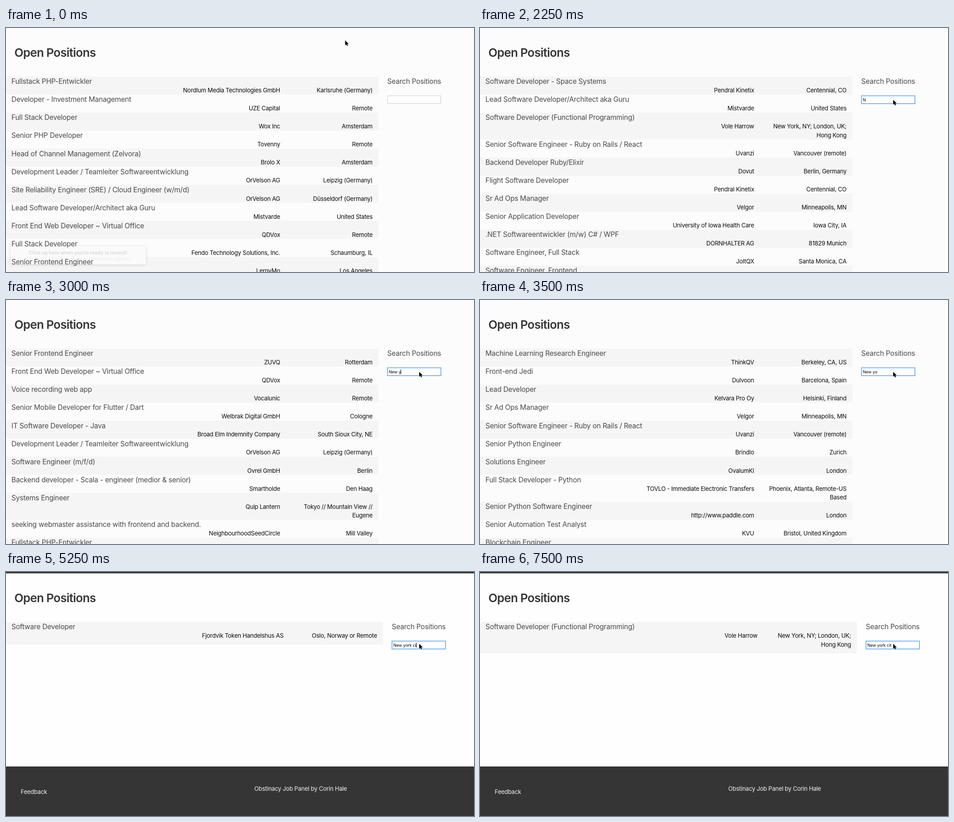
An HTML page that plays this animation: 1033x542 px, repeating every 8000 ms.

```html
<!DOCTYPE html>
<html lang="en">
<head>
<meta charset="utf-8">
<title>Open Positions</title>
<style>
  html, body { margin: 0; width: 100%; height: 100%; overflow: hidden; background: #fcfcfc; }
  svg { display: block; width: 100vw; height: 100vh; }
  text { font-family: Inter, "Open Sans", sans-serif; font-optical-sizing: none; white-space: pre; }
  .head { font-size: 26px; font-weight: 600; letter-spacing: -.72px; fill: #363636; }
  .job { font-size: 15.5px; letter-spacing: -.22px; fill: #4a4a4a; }
  .info { font-size: 13px; letter-spacing: -.25px; fill: #0a0a0a; }
  .end { text-anchor: end; }
  .foot { fill: #f2f2f2; }
  .typed { font-size: 9px; fill: #000; }
  .tip { text-anchor: middle; font-size: 9px; fill: #ededed; }
  .tip.bold { font-size: 10.5px; font-weight: 700; fill: #dcdcdc; }
</style>
</head>
<body>
<svg id="stage" viewBox="0 0 1033 542" preserveAspectRatio="none"></svg>
<script>
const LOOP = 8000;
const stage = document.getElementById('stage');

// One job per line: title | company | location, "~" breaks the location.
const lists = {
  all: `Fullstack PHP-Entwickler|Nordlum Media Technologies GmbH|Karlsruhe (Germany)
Developer - Investment Management|UZE Capital|Remote
Full Stack Developer|Wox Inc|Amsterdam
Senior PHP Developer|Tovenny|Remote
Head of Channel Management (Zelvora)|Brolo X|Amsterdam
Development Leader / Teamleiter Softwareentwicklung|OrVelson AG|Leipzig (Germany)
Site Reliability Engineer (SRE) / Cloud Engineer (w/m/d)|OrVelson AG|Düsseldorf (Germany)
Lead Software Developer/Architect aka Guru|Mistvarde|United States
Front End Web Developer ~ Virtual Office|QDVox|Remote
Full Stack Developer|Fendo Technology Solutions, Inc.|Schaumburg, IL
Senior Frontend Engineer|LernyMo|Los Angeles`,
  n: `Software Developer - Space Systems|Pendral Kinetix|Centennial, CO
Lead Software Developer/Architect aka Guru|Mistvarde|United States
Software Developer (Functional Programming)|Vole Harrow|New York, NY; London, UK;~Hong Kong
Senior Software Engineer - Ruby on Rails / React|Uvanzi|Vancouver (remote)
Backend Developer Ruby/Elixir|Dovut|Berlin, Germany
Flight Software Developer|Pendral Kinetix|Centennial, CO
Sr Ad Ops Manager|Velgor|Minneapolis, MN
Senior Application Developer|University of Iowa Health Care|Iowa City, IA
.NET Softwareentwickler (m/w) C# / WPF|DORNHALTER AG|81829 Munich
Software Engineer, Full Stack|JoltQX|Santa Monica, CA
Software Engineer, Frontend|JoltQX|Santa Monica, CA`,
  ne: `Senior .NET Developer|Zebro Solutions|New Orleans, LA
Software Developer (Functional Programming)|Vole Harrow|New York, NY; London, UK;~Hong Kong
Network DevOps Engineer|Ulvo|Madison, WI
Senior Frontend Engineer|ZUVQ|Rotterdam
Senior Python Engineer|Brindlo|Zurich
Backend Developer Ruby/Elixir|Dovut|Berlin, Germany
Lead Developer|Kelvara Pro Oy|Helsinki, Finland
Test Automation Engineer|Malvix|Vianen
Software Engineer, Full Stack|JoltQX|Santa Monica, CA
Solutions Engineer|OvalumKI|London
Senior PHP Developer|Tovenny|Remote`,
  new: `Software Developer (Functional Programming)|Vole Harrow|New York, NY; London, UK;~Hong Kong
Senior .NET Developer|Zebro Solutions|New Orleans, LA
Lead Software Developer|Ostiml|Calgary
Front-end Jedi|Dulvoon|Barcelona, Spain
IT Software Developer - Java|Broad Elm Indemnity Company|South Sioux City, NE
Sr Ad Ops Manager|Velgor|Minneapolis, MN
Software Engineer (m/f/d)|Ovrel GmbH|Berlin
Flight Software Developer|Pendral Kinetix|Centennial, CO
Lead Engineer (m/f)|Glanzohr GmbH|Munich, Germany
Voice recording web app|Vocalunic|Remote
Senior Application Developer|University of Iowa Health Care|Iowa City, IA`,
  newY: `Senior Frontend Engineer|ZUVQ|Rotterdam
Front End Web Developer ~ Virtual Office|QDVox|Remote
Voice recording web app|Vocalunic|Remote
Senior Mobile Developer for Flutter / Dart|Welbrak Digital GmbH|Cologne
IT Software Developer - Java|Broad Elm Indemnity Company|South Sioux City, NE
Development Leader / Teamleiter Softwareentwicklung|OrVelson AG|Leipzig (Germany)
Software Engineer (m/f/d)|Ovrel GmbH|Berlin
Backend developer - Scala - engineer (medior & senior)|Smartholde|Den Haag
Systems Engineer|Quip Lantern|Tokyo // Mountain View //~Eugene
seeking webmaster assistance with frontend and backend.|NeighbourhoodSeedCircle|Mill Valley
Fullstack PHP-Entwickler|Nordlum Media Technologies GmbH|Karlsruhe (Germany)`,
  newYo: `Machine Learning Research Engineer|ThinkQV|Berkeley, CA, US
Front-end Jedi|Dulvoon|Barcelona, Spain
Lead Developer|Kelvara Pro Oy|Helsinki, Finland
Sr Ad Ops Manager|Velgor|Minneapolis, MN
Senior Software Engineer - Ruby on Rails / React|Uvanzi|Vancouver (remote)
Senior Python Engineer|Brindlo|Zurich
Solutions Engineer|OvalumKI|London
Full Stack Developer - Python|TOVLO - Immediate Electronic Transfers|Phoenix, Atlanta, Remote-US~Based
Senior Python Software Engineer|http://www.paddle.com|London
Senior Automation Test Analyst|KVU|Bristol, United Kingdom
Blockchain Engineer|Fjordvik Token Handelshus AS|Oslo, Norway or Remote`,
  newYor: `Network DevOps Engineer|Ulvo|Madison, WI
Lead Developer|Kelvara Pro Oy|Helsinki, Finland
Senior Python Engineer|Brindlo|Zurich
Backend Engineer (f/m) Node.js|wanduu Group GmbH|Berlin
Senior Frontend Engineer|ZUVQ|Rotterdam
Solutions Engineer|OvalumKI|London
Full Stack Developer|Fendo Technology Solutions, Inc.|Schaumburg, IL
Lead Software Developer|Ostiml|Calgary
Senior Automation Test Analyst|KVU|Bristol, United Kingdom
Test Automation Engineer|Malvix|Vianen
Software Engineer (m/f/d)|Ovrel GmbH|Berlin`,
  newYork: `Softwareentwickler / Software Engineer|OrVelson AG|Leipzig (Germany)
Senior Python Engineer|Brindlo|Zurich
Senior .NET Developer|Zebro Solutions|New Orleans, LA
Network DevOps Engineer|Ulvo|Madison, WI
Full Stack Developer|Fendo Technology Solutions, Inc.|Schaumburg, IL
Senior Mobile Developer | uXO|unTrod unBarter GmbH|Berlin, Germany
Test Automation Engineer|Malvix|Vianen
Lead Engineer (m/f)|Glanzohr GmbH|Munich, Germany
Backend Engineer (f/m) Node.js|wanduu Group GmbH|Berlin
Lead Software Developer|Ostiml|Calgary
IT-Administrator/Applikationsbetreuer (m/w/d) im Betrieb Bilanzierung und Batch|ZuV Kreditverbund|Berlin`,
  space: `Software Developer|Fjordvik Token Handelshus AS|Oslo, Norway or Remote
Senior Python Engineer|Brindlo|Zurich
Senior Frontend Engineer|LernyMo|Los Angeles
Network DevOps Engineer|Ulvo|Madison, WI
Lead Software Developer|Ostiml|Calgary
Senior PHP Developer|Tovenny|Remote
Test Automation Engineer|Malvix|Vianen
Full Stack Developer|Wox Inc|Amsterdam`,
  ci: 'Software Developer|Fjordvik Token Handelshus AS|Oslo, Norway or Remote',
  city: 'Senior Application Developer|University of Iowa Health Care|Iowa City, IA',
  cit: 'Software Developer (Functional Programming)|Vole Harrow|New York, NY; London, UK;~Hong Kong'
};

// Each step changes only what it lists.
const steps = [
  [0, { list: 'all', typed: '', tip: true, pointer: 'arrow', x: 748.5, y: 27.5 }],
  [250, { tip: false, x: 912, y: 143.5 }],
  [500, { pointer: 'beam', x: 917, y: 156 }],
  [750, { y: 157 }],
  [1000, { pointer: 'arrow', x: 912, y: 159.5 }],
  [1250, { focus: true, caret: true }],
  [1750, { caret: false }],
  [2250, { list: 'n', typed: 'N' }],
  [2500, { list: 'ne', typed: 'Ne', caret: true }],
  [2750, { list: 'new', typed: 'New' }],
  [3000, { list: 'newY', typed: 'New y' }],
  [3250, { list: 'newYo', typed: 'New yo' }],
  [3500, { caret: false }],
  [4000, { list: 'newYor', typed: 'New yor', caret: true }],
  [4500, { list: 'newYork', typed: 'New york' }],
  [4750, { list: 'space', typed: 'New york ', footer: 447 }],
  [5000, { caret: false }],
  [5250, { list: 'ci', typed: 'New york ci', caret: true, footer: 432, short: true }],
  [5500, { list: 'city', typed: 'New york city' }],
  [5750, { caret: false }],
  [6250, { list: 'ci', typed: 'New york cit', caret: true }],
  [6750, { caret: false }],
  [7000, { list: 'city', typed: 'New york city', caret: true }],
  [7500, { list: 'cit', typed: 'New york cit', caret: false }]
];

const escapeText = s => s.replace(/&/g, '&amp;').replace(/</g, '&lt;');
const text = (x, y, cls, s) => `<text x="${x}" y="${y}" class="${cls}">${escapeText(s)}</text>`;
const rect = (x, y, w, h, fill, more = '') =>
  `<rect x="${x}" y="${y}" width="${w}" height="${h}" fill="${fill}" ${more}/>`;

function jobs(s, top) {
  const width = s.short ? 832 : 822;
  const companyX = s.short ? 612.5 : 605;
  let y = top, stripes = '', labels = '';
  lists[s.list].split('\n').forEach((line, i) => {
    const parts = line.split('|');
    const places = parts.pop().split('~');
    const company = parts.pop();
    const height = (places.length > 1 ? 59.6 : 40.05) + (s.short ? 10 : 0);
    if (i % 2 === 0) {
      stripes += rect(0, Math.round(y), width, Math.round(y + height) - Math.round(y), '#f5f5f5');
    }
    labels += text(12, y + 16.3, 'job', parts.join('|'));
    labels += text(companyX, y + 35.2, 'info end', company);
    places.forEach((p, k) => labels += text(width - 13, y + 35.2 + k * 19.7, 'info end', p));
    y += height;
  });
  return stripes + (s.tip ? hint() : '') + labels;
}

function hint() {
  return rect(10, 485, 299, 40, '#fafafa', 'rx="4" style="filter:drop-shadow(0 1px 3px #0002)"') +
    text(159, 502.7, 'tip bold', 'Click up here when you’re ready to record!') +
    text(160, 516.3, 'tip', 'You can still move and change the size of your selection.');
}

function search(s, left, top) {
  const box = s.focus
    ? rect(left, top + 42.5, 118, 17.5, '#fff', 'stroke="#80b5ee" stroke-width="2"')
    : rect(left + .5, top + 42.5, 117, 17, '#fff', 'stroke="#cacaca"');
  return text(left - .5, top + 16.3, 'job', 'Search Positions') + box +
    `<text id="typed" x="${left + 3}" y="${top + 55}" class="typed">${s.typed}</text>` +
    (s.caret ? rect(left + 3, top + 46, 1, 11, '#000', 'id="caret"') : '');
}

function footer(y) {
  return rect(0, y, 1033, 542 - y, '#353535') +
    text(32.5, y + 60.5, 'info foot', 'Feedback') +
    text(548, y + 54, 'info foot', 'Obstinacy Job Panel by Corin Hale');
}

function pointer(s) {
  const shape = s.pointer === 'arrow'
    ? 'M0 0V11L2.5 8.7L4.2 12.6L6.2 11.8L4.5 8H8Z'
    : 'M-3 .5Q0 .5 0 3V11Q0 13.5 -3 13.5M3 .5Q0 .5 0 3M0 11Q0 13.5 3 13.5';
  const paint = s.pointer === 'arrow'
    ? 'fill="#000" stroke="#fff" stroke-width="1" paint-order="stroke"'
    : 'fill="none" stroke="#222"';
  return `<path d="${shape}" transform="translate(${s.x} ${s.y})" ${paint}/>`;
}

function draw(s) {
  const top = s.short ? 111 : 108;
  const left = s.short ? 852 : 842;
  stage.innerHTML = rect(0, 0, 1033, 542, s.short ? '#fefefe' : '#fcfcfc') +
    (s.short ? rect(0, 0, 1033, 3, '#353535') : '') +
    text(18.5, top - 44.3, 'head', 'Open Positions') +
    jobs(s, top) + search(s, left, top) +
    (s.footer ? footer(s.footer) : '') + pointer(s);
  const caret = document.getElementById('caret');
  if (caret && s.typed) {
    const width = document.getElementById('typed').getComputedTextLength();
    caret.setAttribute('x', Math.floor(left + 3 + width));
  }
}

let shown = -1;
const start = performance.now();

function tick() {
  const t = (performance.now() - start) % LOOP;
  const past = steps.filter(([at]) => at <= t);
  if (past.length !== shown) {
    shown = past.length;
    draw(Object.assign({}, ...past.map(([, change]) => change)));
  }
  requestAnimationFrame(tick);
}
tick();
</script>
</body>
</html>
```
